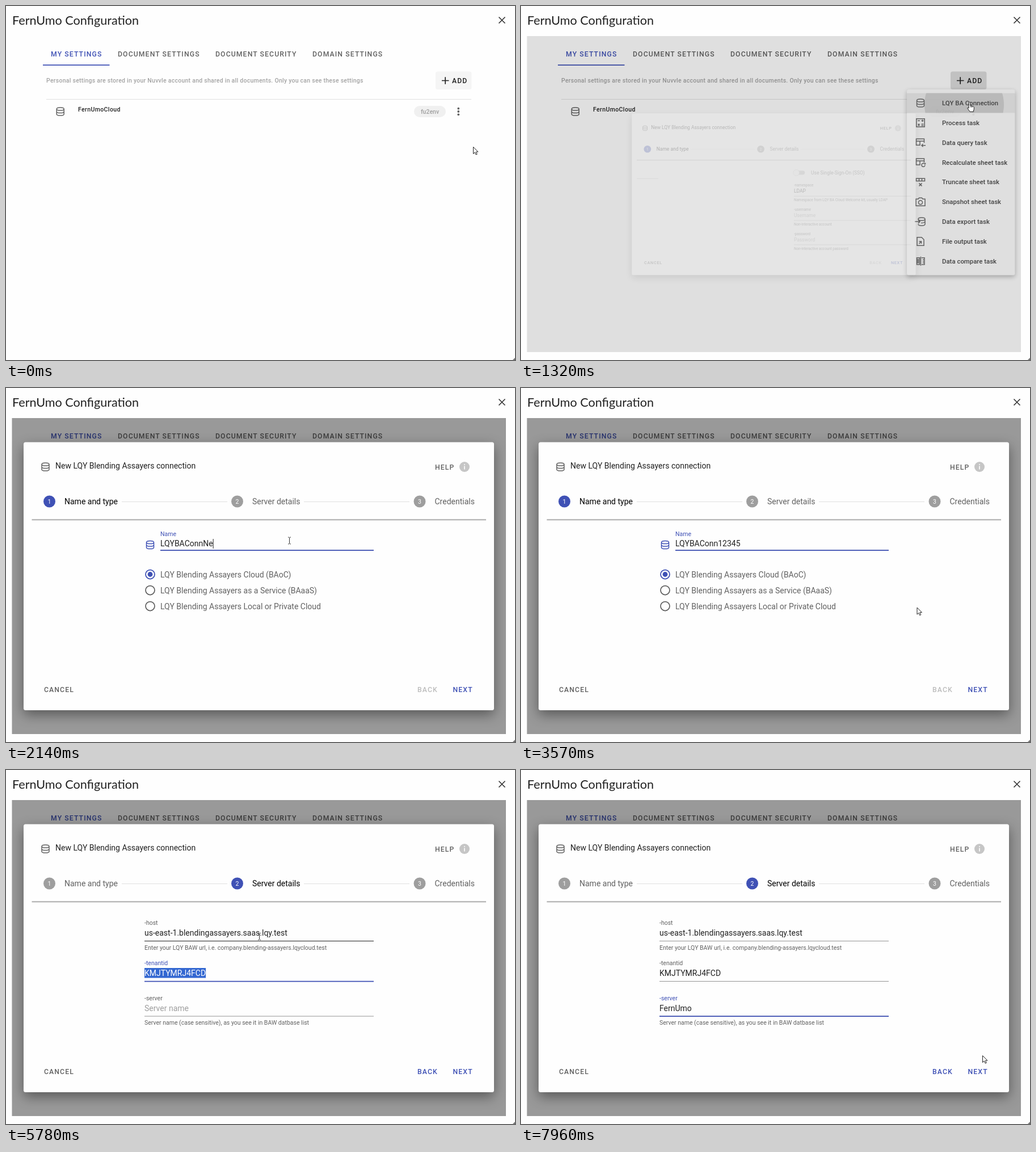
Write an HTML page that moves like this. It is 897 px wide and 624 px high and loops after 8 s.

```html
<!DOCTYPE html>
<html lang="en">
<head>
<meta charset="utf-8">
<title>Connection setup</title>
<style>
html, body { margin: 0; width: 100%; height: 100%; overflow: hidden; background: #fefefe; }
svg { display: block; width: 897px; height: 624px; font-family: Roboto, sans-serif; }
text { white-space: pre; }
.title { font: 21.6px Lato, sans-serif; }
.caps { font-size: 12.25px; font-weight: 500; letter-spacing: 1.09px; }
.small { font-size: 10.5px; }
.body { font-size: 14px; }
.menu { font-size: 11.4px; font-weight: 500; }
.icon { fill: none; stroke: #616161; stroke-width: 1.5; }
#dialog > .sheet { filter: drop-shadow(0 8px 11px rgba(0,0,0,.42)); }
#menu > .sheet { filter: drop-shadow(0 3px 4px rgba(0,0,0,.3)); }
</style>
</head>
<body>
<svg id="stage" viewBox="0 0 897 624"></svg>
<script>
const LOOP = 8000, BLUE = '#3f51b5', GREY = '#616161', INK = '#212121', PALE = '#9e9e9e';
const SLIDE = 800;

// markup helpers
const text = (x, y, s, cls = 'body', fill = INK, extra = '') =>
  `<text x="${x}" y="${y}" class="${cls}" fill="${fill}" ${extra}>${s}</text>`;
const rect = (x, y, w, h, fill, extra = '') =>
  `<rect x="${x}" y="${y}" width="${w}" height="${h}" fill="${fill}" ${extra}/>`;
const line = (x1, x2, y, stroke, width = 1, extra = '') =>
  `<path d="M${x1} ${y}H${x2}" stroke="${stroke}" stroke-width="${width}" ${extra}/>`;
const circle = (x, y, r, fill, extra = '') =>
  `<circle cx="${x}" cy="${y}" r="${r}" fill="${fill}" ${extra}/>`;
const icon = (x, y, d, extra = '') =>
  `<path class="icon" transform="translate(${x} ${y})" d="${d}" ${extra}/>`;

const DB = 'M-6.5-4.5a6.5 2.6 0 0 1 13 0v9a6.5 2.6 0 0 1-13 0zM-6.5-4.5a6.5 2.6 0 0 0 13 0M-6.5 0a6.5 2.6 0 0 0 13 0';
const TABLE = 'M-7.5-6.5h14v4h-14zM-7.5-2.5v7h6.5v-7M6.5-2.5v3';
const MENU = [
  ['LQY BA Connection', DB],
  ['Process task', 'M-7.2-7.2h14.4v14.4h-14.4zM-5-3.5h4M1.5-3.5h4M3.5-5.5v4M-4.5 2l3 3m0-3l-3 3M1.5 2.5h4M1.5 5h4'],
  ['Data query task', TABLE + 'M2 5h7M4.5 2.5l-2.5 2.5 2.5 2.5'],
  ['Recalculate sheet task', TABLE + 'M8 5a3 3 0 1 1-1-2.5M8.5 1v2h-2'],
  ['Truncate sheet task', 'M-7.5-6.5h15v4.5h-15zM-2.5-6.5v4.5M2.5-6.5v4.5M-2.5 2l5 5m0-5l-5 5'],
  ['Snapshot sheet task', 'M-8-5h4l1.5-2h5l1.5 2h4v12h-16zM-3.5 1a3.5 3.5 0 1 0 7 0a3.5 3.5 0 1 0-7 0'],
  ['Data export task', 'M-4-4.5a6 2.6 0 0 1 12 0v9a6 2.6 0 0 1-12 0M-4-4.5a6 2.6 0 0 0 12 0M1 2.5q5 0 7-2.5M-10 0h9m-3-3l3 3-3 3'],
  ['File output task', 'M-6-7.2h8l4 4v10.4h-12zM-2.5 4l4-4m-4 0h4v4'],
  ['Data compare task', 'M-6.5-6h5v12h-5zM-5.5-4v8M-3.5-4v8M.5-8v16M2-6h5v12h-5M4-3h2M4 0h2M4 3h2']
];

function field(id, x, y, width, label, placeholder, hint = '', [inputDy, lineDy] = [19, 28.5]) {
  const base = y + inputDy, rule = y + lineDy;
  return `<g id="${id}" data-x="${x}" data-mid="${x + width / 2}">
    ${text(x, y, label, 'small label', GREY)}
    ${rect(x, base - 14, 0, 17.5, '#3367d1', 'class="selection"')}
    ${text(x, base, placeholder, 'body hintText', PALE)}${text(x, base, '', 'body value')}
    ${line(x, x + width, rule, '#949494', 1, 'class="rule"')}
    ${line(x, x + width, rule, BLUE, 1.75, 'class="focus"')}
    ${text(x, y + 43.5, hint, 'small', GREY)}
    ${rect(x, base - 13, 1, 17, INK, 'class="caret"')}</g>`;
}

const stepMark = (n, x, labelX, label) => circle(x, 200, 10.5, PALE, `id="dot${n}"`) +
  text(x, 203.8, n, 'small', '#fff', 'text-anchor="middle"') + text(labelX, 205, label, 'body', GREY, `id="step${n}"`);

const radio = (y, label, on) =>
  circle(254, y, 8, 'none', `stroke="${on ? BLUE : GREY}" stroke-width="1.75"`) +
  (on ? circle(254, y, 4.4, BLUE) : '') + text(272, y + 5, label, 'body', GREY);

const page = `
  ${text(11, 32.5, 'FernUmo Configuration', 'title')}
  <path d="M868.5 19.5l11 11m0-11l-11 11" stroke="#333" stroke-width="1.6"/>
  <path d="M897 620v4h-4z" fill="#777"/>
  ${text(79, 89, 'MY SETTINGS', 'caps', BLUE)}${text(197, 89, 'DOCUMENT SETTINGS', 'caps', GREY)}
  ${text(369, 89, 'DOCUMENT SECURITY', 'caps', GREY)}${text(540, 89, 'DOMAIN SETTINGS', 'caps', GREY)}
  ${line(65, 182.5, 104.2, BLUE, 1.75)}
  ${text(71, 134.5, 'Personal settings are stored in your Nuvvle account and shared in all documents. Only you can see these settings', 'small', '#a3a3a3', 'font-weight="500" letter-spacing=".25"')}
  ${rect(757, 115.5, 63.5, 31.5, '#f5f5f5', 'rx="3.5"')}${rect(757, 115.5, 63.5, 31.5, '#000', 'rx="3.5" id="addHover"')}
  <path d="M768 131.5h12.5M774.2 125.3v12.5" stroke="${INK}" stroke-width="1.7"/>${text(786, 136, 'ADD', 'caps')}
  ${line(71, 820, 164.5, '#e0e0e0')}
  ${icon(95.7, 186, DB)}${text(127, 186, 'FernUmoCloud', 'small', INK, 'font-weight="500" letter-spacing=".4"')}
  ${rect(719, 176, 56, 20, '#f0f0f0', 'rx="10"')}${text(747, 189.7, 'fu2env', 'small', '#a0a0a0', 'font-weight="500" text-anchor="middle"')}
  ${[180.7, 186, 191.3].map(y => circle(797.3, y, 1.9, GREY)).join('')}`;

const menu = `<g id="menu"><g class="sheet">${rect(680, 147, 190.5, 327.5, '#fefefe', 'rx="3.5"')}</g>
  ${rect(680, 153.6, 190.5, 34.8, '#000', 'id="itemHover"')}
  <g clip-path="url(#itemClip)">${circle(781, 174, 0, '#000', 'id="ripple" opacity=".13"')}</g>
  ${MENU.map(([label, d], i) => icon(704, 171 + 34.85 * i, d) + text(742, 175 + 34.85 * i, label, 'menu', '#3c3c3c')).join('')}</g>`;

const dialog = `<g id="dialog"><g class="sheet">${rect(31, 95.5, 829, 472.5, '#fefefe', 'rx="3.5"')}</g>
  ${icon(69.5, 139, DB)}${text(87, 142, 'New LQY Blending Assayers connection')}
  ${text(756, 143.5, 'HELP', 'caps', GREY)}${circle(808, 139, 9, '#c6c6c6')}
  <path d="M808 137.5v6M808 134v1.8" stroke="#fff" stroke-width="1.6"/>
  ${stepMark(1, 76.5, 103, 'Name and type')}${stepMark(2, 407.5, 434, 'Server details')}${stepMark(3, 729, 755.5, 'Credentials')}
  ${line(204, 390, 200.5, '#e0e0e0')}${line(525, 711, 200.5, '#e0e0e0')}
  ${line(45.5, 846, 232, PALE, 1.5)}${line(45.5, 846, 233.4, '#dcdcdc')}
  <g clip-path="url(#bodyClip)">
    <g id="page1">${icon(254, 276.5, DB, 'id="nameIcon"')}
      ${field('name', 272, 261, 376, 'Name', '', '', [18, 25])}
      ${radio(328.5, 'LQY Blending Assayers Cloud (BAoC)', true)}
      ${radio(356.5, 'LQY Blending Assayers as a Service (BAaaS)')}
      ${radio(384.5, 'LQY Blending Assayers Local or Private Cloud')}</g>
    <g id="page2">
      ${field('host', 244, 273, 404, '-host', 'LQY BAW url, i.e. company.blendingassayers.saas.lqy.test', 'Enter your LQY BAW url, i.e. company.blending-assayers.lqycloud.test')}
      ${field('tenant', 244, 344, 404, '-tenantid', 'Tenant ID')}
      ${field('server', 244, 405.5, 404, '-server', 'Server name', 'Server name (case sensitive), as you see it in BAW datbase list')}</g>
    <g id="page3">${rect(246, 263, 30, 12, '#bdbdbd', 'rx="6"')}${circle(251, 269, 9, '#fafafa', 'stroke="#bbb"')}
      ${text(294, 274, 'Use Single-Sign-On (SSO)', 'body', GREY)}
      ${field('space', 244, 309, 404, '-namespace', '', 'Namespace from LQY BA Cloud Welcome kit, usually LDAP')}
      ${field('user', 244, 380, 404, '-username', 'Username', 'Non-interactive account')}
      ${field('pass', 244, 451, 404, '-password', 'Password', 'Non-interactive account password')}</g>
  </g>
  ${rect(776.5, 515.5, 55.5, 31.5, '#c5c9e9', 'rx="3.5" id="nextHover"')}
  ${text(67, 535.5, 'CANCEL', 'caps', GREY)}${text(725, 535.5, 'BACK', 'caps', BLUE, 'id="back"')}${text(787.5, 535.5, 'NEXT', 'caps', BLUE)}</g>`;

const CURSORS = {
  arrow: '<path d="M0 0v12l2.8-2.6 1.9 4.2 2-.9-1.9-4.1h3.7z" fill="#fff" stroke="#222"/>',
  hand: '<path d="M-1.3 1.2a1.3 1.3 0 0 1 2.6 0v5l5 1.2q1.5.4 1.5 2v3l-1.2 4.4h-6l-4.6-6.4q.3-1.6 2.7.2zM2 7v2M4.3 7.5v2" fill="#fff" stroke="#222"/>',
  beam: '<path d="M-2.5-6q2 0 2.5 1q.5-1 2.5-1M0-5v10M-2.5 6q2 0 2.5-1q.5 1 2.5 1" fill="none" stroke="#333"/>'
};

const stage = document.getElementById('stage');
stage.innerHTML = `<defs>
  <clipPath id="bodyClip">${rect(45.5, 234, 800.5, 276, '#000')}</clipPath>
  <clipPath id="itemClip">${rect(680, 153.6, 190.5, 34.8, '#000')}</clipPath></defs>
  ${page}${menu}${rect(10.5, 53, 870.5, 557, '#000', 'id="shade"')}${dialog}
  ${Object.entries(CURSORS).map(([k, d]) => `<g id="${k}">${d}</g>`).join('')}`;

// motion helpers
const $ = id => document.getElementById(id);
const set = (el, attrs) => { for (const k in attrs) el.setAttribute(k, attrs[k]); };
const ramp = (t, start, length) => Math.min(1, Math.max(0, (t - start) / length));
const smooth = u => u * u * (3 - 2 * u);
const within = (t, a, b) => t >= a && t < b;
const latest = (list, t) => list.filter(e => e[0] <= t).pop();
const shift = (id, dx) => set($(id), { transform: `translate(${dx} 0)` });

const typing = (word, times, stem = '') => times.map((t, i) => [t, stem + word.slice(0, i + 1)]);
const STEM = 'LQYBAConn';
const IDLE = { focus: 9000, blur: 9000 };
const FIELDS = {
  name: { focus: 1930, blur: 4070, edits: [[0, STEM + 'New'], [2130, STEM + 'Ne'], [2200, STEM + 'N'], [2260, STEM],
    ...typing('12345', [2380, 2460, 2710, 2820, 3030], STEM)] },
  host: { focus: 4960, blur: 5570, hover: [4880, 6000], edits: [[0, ''], [5240, 'us-east-1.blendingassayers.saas.lqy.test']] },
  tenant: { focus: 5570, blur: 5960, selected: true, edits: [[0, ''], [5570, 'KMJTYMRJ4FCD']] },
  server: { focus: 5960, blur: 9000, edits: [[0, ''], ...typing('FernUmo', [6600, 6690, 6780, 7030, 7320, 7390, 7460])] },
  space: { ...IDLE, edits: [[0, 'LDAP']] },
  user: { ...IDLE, edits: [[0, '']] },
  pass: { ...IDLE, edits: [[0, '']] }
};

function drawField(id, t) {
  const { focus, blur, edits, selected, hover = [0, 0] } = FIELDS[id];
  const group = $(id), part = cls => group.querySelector('.' + cls);
  const { x, mid } = group.dataset;
  const [editTime, value] = latest(edits, t);
  const active = within(t, focus, blur), marked = active && selected;
  const valueEl = part('value');
  if (valueEl.textContent !== value) valueEl.textContent = value;
  const width = valueEl.getComputedTextLength();
  set(valueEl, { fill: marked ? '#fff' : INK });
  set(part('selection'), { width: marked ? width : 0 });
  set(part('hintText'), { opacity: value ? 0 : 1 });
  set(part('label'), { fill: active ? BLUE : GREY });
  set(part('rule'), { stroke: within(t, ...hover) ? INK : '#949494' });
  const spread = .5 + .5 * smooth(ramp(t, focus, 200));
  set(part('focus'), {
    opacity: ramp(t, focus, 100) * (1 - ramp(t, blur, 180)),
    transform: `translate(${mid} 0) scale(${spread} 1) translate(${-mid} 0)`
  });
  const blinkOn = (t - Math.max(focus, editTime)) % 1000 < 500;
  set(part('caret'), { x: +x + width, opacity: active && !marked && blinkOn ? 1 : 0 });
}

const PATH = [[0, 823.5, 248.5], [70, 823.5, 248.5], [480, 790, 131], [740, 790, 131], [1000, 790.5, 169.5], [1440, 790.5, 169.5],
  [1670, 725, 171], [1880, 499.5, 269], [3320, 499.5, 269], [3800, 871, 490], [4020, 811, 529.5], [4460, 811, 529.5],
  [4880, 446.5, 293.5], [7700, 446.5, 372], [7960, 813.5, 503.5], [8000, 813.5, 503.5]];
PATH.splice(13, 0, [6000, 446.5, 293.5]);
const SHAPES = [[0, 'arrow'], [400, 'hand'], [1460, 'arrow'], [1830, 'beam'], [3400, 'arrow'], [3960, 'hand'],
  [4530, 'arrow'], [4810, 'beam'], [6000, ''], [7710, 'arrow']];

function drawCursor(t) {
  const i = PATH.findIndex(p => p[0] > t);
  const [t0, x0, y0] = PATH[i - 1], [t1, x1, y1] = PATH[i];
  const u = smooth(ramp(t, t0, t1 - t0)), shape = latest(SHAPES, t)[1];
  for (const id in CURSORS)
    set($(id), { opacity: id === shape ? 1 : 0, transform: `translate(${x0 + (x1 - x0) * u} ${y0 + (y1 - y0) * u})` });
}

function draw(t) {
  set($('addHover'), { opacity: .1 * ramp(t, 420, 100) });
  const opened = smooth(ramp(t, 620, 120)), grow = .8 + .2 * opened;
  set($('menu'), {
    opacity: opened * (1 - ramp(t, 1312, 100)),
    transform: `translate(870 147) scale(${grow}) translate(-870 -147)`
  });
  set($('itemHover'), { opacity: t > 930 ? .07 : 0 });
  set($('ripple'), { r: 70 * smooth(ramp(t, 1180, 140)) });
  set($('shade'), { opacity: .4 * ramp(t, 1288, 108) });

  const left = (1 - ramp(t, 1312, 121)) ** 3, scale = 1 - .5 * left;
  set($('dialog'), {
    opacity: t < 1312 ? 0 : 1 - left,
    transform: `translate(445.5 331.7) scale(${scale}) translate(-445.5 -331.7)`
  });
  const enter = smooth(ramp(t, 1260, 160)), next = smooth(ramp(t, 4100, 366));
  shift('page1', SLIDE * (enter - 1 - next));
  shift('page2', SLIDE * (1 - next));
  shift('page3', SLIDE * enter);

  const step = t > 4105 ? 2 : 1;
  for (const n of [1, 2, 3]) {
    set($('dot' + n), { fill: n === step ? BLUE : PALE });
    set($('step' + n), { fill: n === step ? '#000' : GREY });
  }
  set($('back'), { fill: step === 2 ? BLUE : '#bdbdbd' });
  set($('nextHover'), { opacity: ramp(t, 3970, 80) * (1 - ramp(t, 4540, 100)) });
  $('nameIcon').style.stroke = within(t, FIELDS.name.focus, FIELDS.name.blur) ? BLUE : GREY;
  for (const id in FIELDS) drawField(id, t);
  drawCursor(t);
}

const began = performance.now();
function tick() {
  draw((performance.now() - began) % LOOP);
  requestAnimationFrame(tick);
}
tick();
</script>
</body>
</html>
```
